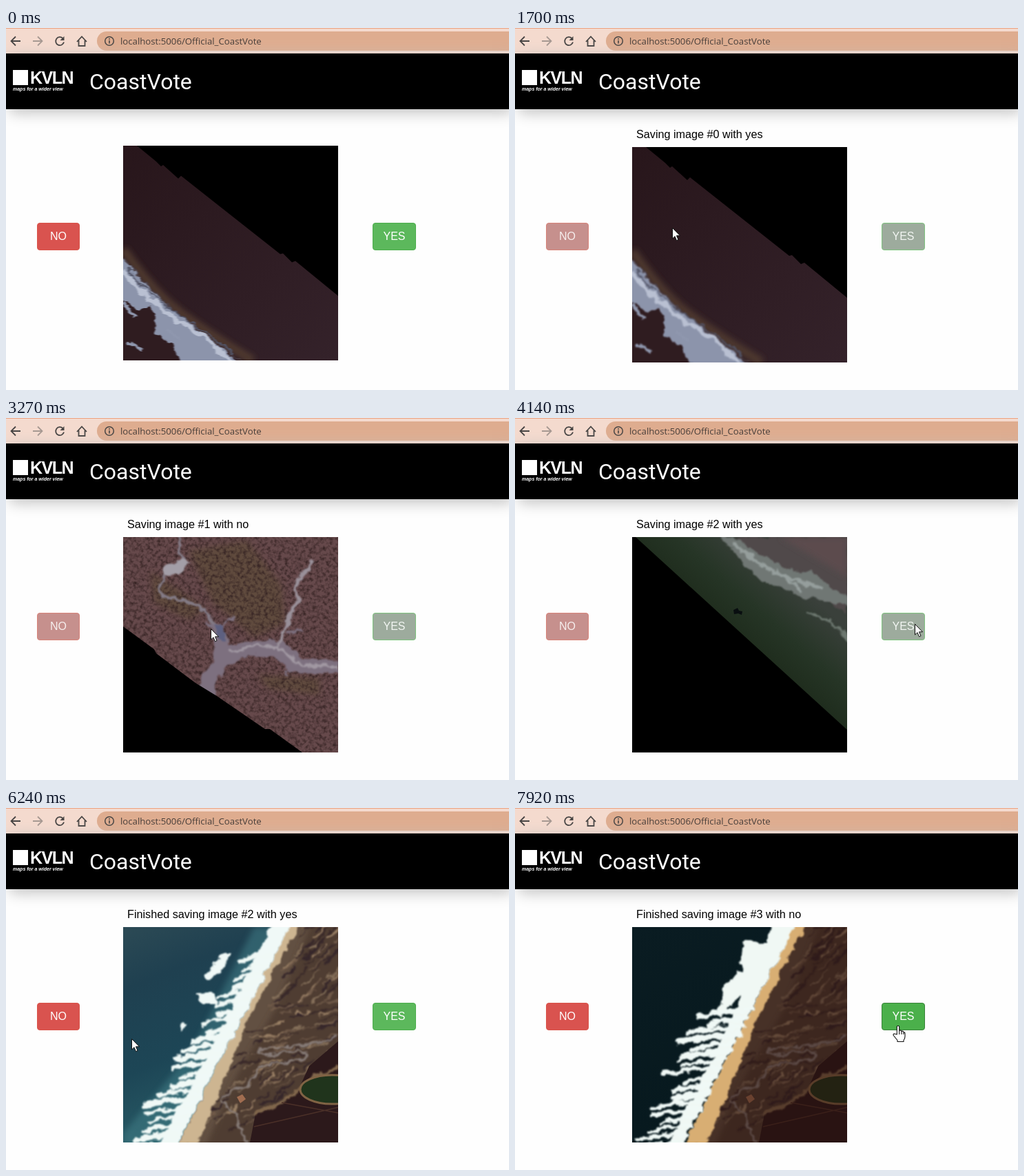
Write an HTML page that moves like this. It is 730x526 px and loops after 7990 ms.

```html
<!DOCTYPE html>
<html lang="en">
<head>
<meta charset="utf-8">
<title>CoastVote</title>
<style>
html, body { margin: 0; width: 100%; height: 100%; overflow: hidden; background: #fefefe; }
#stage { position: relative; width: 730px; height: 526px; overflow: hidden; }
#stage > * { position: absolute; }
#bar { left: 0; top: 0; width: 730px; height: 37px; background: #f4dace; box-shadow: inset 0 1px #eba383; }
#bar svg { position: absolute; left: 0; top: 0; }
#url { position: absolute; left: 166px; top: 10px; font: 13.2px/18px "Open Sans", sans-serif; color: #453c38; }
#head { left: 0; top: 37px; width: 730px; height: 81px; background: #000; color: #fff; box-shadow: 5px 5px 20px silver; }
#head * { position: absolute; white-space: nowrap; }
#mark { left: 10px; top: 24px; width: 22px; height: 22px; background: #fff; }
#org { left: 35px; top: 20px; font: bold 25px/30px "Liberation Sans", sans-serif; letter-spacing: -1.5px; }
#tag { left: 10px; top: 47px; font: italic bold 7px/10px "Liberation Sans", sans-serif; }
#name { left: 121px; top: 21px; font: 32px/40px Roboto, sans-serif; }
#msg { left: 176px; top: 145px; font: 16.2px/19px "Liberation Sans", Arial, sans-serif; color: #000; white-space: nowrap; }
.btn { top: 283px; height: 40px; box-sizing: border-box; border: 1px solid; border-radius: 4px; color: #fff;
  font: 16px/38px "Liberation Sans", Arial, sans-serif; text-align: center; }
#no { left: 45px; width: 62px; background: #d9534f; border-color: #d9544a; }
#yes { left: 532px; width: 63px; background: #5cb85c; border-color: #4cae4c; }
#no.hover { background: #d2413c; border-color: #ac2925; }
#yes.hover { background: #4bb04b; border-color: #398439; }
#no.off { background: #c6908d; border-color: #d9847a; color: #f6efee; }
#yes.off { background: #9dab9d; border-color: #7fc47f; color: #f2f5f2; }
#view { left: 170px; top: 173px; transform-origin: 0 0; }
.pic { visibility: hidden; }
.pic.on { visibility: visible; }
.lines { fill: none; stroke-linecap: round; }
#cursor { left: 0; top: 0; overflow: visible; fill: #fff; stroke: #111; stroke-linejoin: round; }
</style>
</head>
<body>
<div id="stage">
  <div id="bar">
    <svg width="730" height="37" fill="none" stroke="#474443" stroke-width="1.8">
      <rect x="132" y="5" width="640" height="28" rx="14" fill="#deac8f" stroke="none"/>
      <path d="M21 19H8M14 12.500L7.500 19L14 25.500"/>
      <path d="M39 19H52M46 12.500L52.500 19L46 25.500" stroke="#a69891"/>
      <path d="M82.500 15A6 6 0 1 0 84 20.500"/>
      <path d="M84.500 12V18H78.500Z" fill="#474443" stroke="none"/>
      <path d="M103 20L110 12.500L117 20M105.500 18V26H114.500V18"/>
      <circle cx="150" cy="19" r="6.300" stroke-width="1.500"/>
      <path d="M150 18V22.500M150 15V16.700" stroke-width="1.600"/>
    </svg>
    <div id="url">localhost:5006/Official_CoastVote</div>
  </div>
  <div id="head">
    <div id="mark"></div><div id="org">KVLN</div>
    <div id="tag">maps for a wider view</div>
    <div id="name">CoastVote</div>
  </div>
  <div id="msg"></div>

  <svg id="view" width="312" height="313" viewBox="0 0 312 313">
    <defs>
      <filter id="rough" x="-10%" y="-10%" width="120%" height="120%" color-interpolation-filters="sRGB">
        <feTurbulence type="fractalNoise" baseFrequency=".07" numOctaves="3" seed="4"/>
        <feDisplacementMap in="SourceGraphic" scale="13" xChannelSelector="R" yChannelSelector="G"/>
        <feGaussianBlur stdDeviation=".8"/>
      </filter>
      <filter id="mottle" x="0" y="0" width="100%" height="100%" color-interpolation-filters="sRGB">
        <feTurbulence type="fractalNoise" baseFrequency=".2" numOctaves="2" seed="7"/>
        <feColorMatrix values="0 0 0 0 .2  0 0 0 0 .13  0 0 0 0 .13  2 0 0 0 -.8"/>
        <feGaussianBlur stdDeviation=".6"/>
      </filter>
      <filter id="soft"><feGaussianBlur stdDeviation="4"/></filter>
      <linearGradient id="mud" x2="1" y2="1"><stop stop-color="#28161b"/><stop offset="1" stop-color="#34222a"/></linearGradient>
      <linearGradient id="green" x1=".4" y1=".6" x2=".75" y2=".2"><stop stop-color="#172313"/><stop offset=".6" stop-color="#263526"/><stop offset="1" stop-color="#3a403b"/></linearGradient>
      <linearGradient id="teal" x2=".4" y2="1"><stop stop-color="#2c4a55"/><stop offset=".25" stop-color="#1f4050"/><stop offset=".6" stop-color="#1d4656"/><stop offset="1" stop-color="#2c616a"/></linearGradient>
      <linearGradient id="deep" x2=".6" y2="1"><stop stop-color="#0a1c22"/><stop offset="1" stop-color="#06181d"/></linearGradient>
      <g id="land">
        <path d="M244 0H312V313H81Z" fill="#625042"/>
        <path d="M275 -10H330V323H118L165 215L220 120Z" fill="#4f3d33" filter="url(#soft)"/>
        <g id="streaks" class="lines" filter="url(#rough)"></g>
        <path d="M312 166L270 202L255 235L226 258L192 272L184 313H312Z" fill="#2c191b"/>
        <path d="M192 268Q225 262 256 237Q270 218 312 205" fill="none" stroke="#80664b" stroke-width="6" filter="url(#rough)"/>
        <path d="M230 255L312 270M190 290L312 262" stroke="#4b3028" stroke-width="1.500"/>
        <path d="M311 158Q300 168 280 169T240 174T198 175Q196 190 225 184T267 181Q268 193 244 195T198 204Q186 224 178 233Q157 238 146 244Q136 254 154 262Q168 270 168 292L180 313" fill="none" stroke="#857a76" stroke-width="3" filter="url(#rough)"/>
        <ellipse cx="303" cy="236" rx="46" ry="21" fill="#20341c" stroke="#806344" stroke-width="3"/>
        <path d="M165 247l8-4 5 7-8 6z" fill="#a16d50"/>
      </g>
    </defs>

    <g class="pic">
      <path d="M0 0H312V313H0Z" fill="url(#mud)"/>
      <path d="M20 0L48 23L55 30L58 28L80 48L84 44L228 158L232 157L245 170L250 168L312 219V0Z"/>
      <path d="M0 151Q30 195 60 224T188 313" fill="none" stroke="#4d392f" stroke-width="13" filter="url(#soft)"/>
      <g filter="url(#rough)">
        <path d="M0 165Q30 203 65 232T182 325H-9V165Z" fill="#8c94ab"/>
        <path d="M-9 219L18 238L40 234L50 258L48 276L72 290L91 325H-9Z" fill="#2f1c20"/>
        <path d="M0 182L35 221L75 252L116 278L155 313" fill="none" stroke="#b9c0d2" stroke-width="7"/>
        <path d="M0 165Q30 203 65 232T172 313" fill="none" stroke="#4b3f45" stroke-width="2"/>
        <path d="M6 178Q36 217 80 245T160 302" fill="none" stroke="#525466" stroke-width="2"/>
        <path d="M0 229L15 250M5 285L28 297M60 265L82 282" stroke="#8f97ae" stroke-width="5"/>
      </g>
    </g>

    <g class="pic">
      <path d="M0 0H312V313H0Z" fill="#66494b"/>
      <g fill="#5b4b35" opacity=".6" filter="url(#soft)">
        <path d="M95 20L180 5L230 70L235 125L190 145L130 95Z"/>
        <path d="M40 50L82 78L120 105L95 120L45 95ZM195 200L285 205L285 230L210 220Z"/>
      </g>
      <path d="M0 0H312V313H0Z" filter="url(#mottle)"/>
      <g fill="none" stroke-linejoin="round" filter="url(#rough)">
        <path d="M106 236L114 200L133 178L132 146L120 125L143 127L153 157L187 151L226 148L258 174L312 181V198L245 197L217 174L178 172L148 190L135 216L130 238Z" fill="#7d707f"/>
        <path d="M80 -5L82 18L88 35M62 54L53 70L57 87L92 91L120 107L140 137" stroke="#837b86" stroke-width="4.500"/>
        <path d="M60 43L85 31L96 38L80 55L62 54Z" fill="#a39ea7"/>
        <path d="M275 35L262 56L250 63L254 93L242 111L240 130L223 157" stroke="#9a919a" stroke-width="5"/>
        <path d="M240 141L262 134M145 130L153 118L164 115M238 193L236 199" stroke="#7d7180" stroke-width="3"/>
        <path d="M155 165L190 158L224 159L254 184L312 190" stroke="#a198a2" stroke-width="4"/>
        <path d="M132 128L145 128L147 150L138 146Z" fill="#5d6080"/>
      </g>
      <path d="M0 130L45 163L48 169L105 212L136 231L206 279L213 279L260 313H0Z"/>
    </g>

    <g class="pic">
      <path d="M0 0H312V313H0Z" fill="url(#green)"/>
      <path d="M145 0H312V111L268 80L225 65Z" fill="#50494a" filter="url(#rough)"/>
      <path d="M215 0H312V58Z" fill="#5b4c4e" filter="url(#soft)"/>
      <g filter="url(#rough)">
        <path d="M125 -5L154 4L189 28L235 49L265 53L295 78L316 88V103L282 91L250 90L215 72L185 62L160 35Z" fill="#707774"/>
        <path d="M145 9L190 43L233 62L277 75M206 47L245 78" fill="none" stroke="#959e9c" stroke-width="5"/>
        <path d="M253 108L278 119L298 132L315 149" fill="none" stroke="#6c776f" stroke-width="4"/>
      </g>
      <path d="M5 0L312 280V313H0V0Z"/>
      <path d="M147 106l6 -3 2 4 5 1-1 5-5-2-6 1z" fill="#090e10"/>
    </g>

    <g class="pic">
      <path d="M0 0H312V313H0Z" fill="url(#teal)"/>
      <path d="M190 0L100 180L0 300V323H90L240 0Z" fill="#3f7c85" opacity=".55" filter="url(#soft)"/>
      <use href="#land"/>
      <path d="M242 -5H256L185 127L108 318H78Z" fill="#cdb591" filter="url(#rough)"/>
      <g fill="#f0f9f7" filter="url(#rough)">
        <path d="M219 -8H246L77 318H52L148 138L180 70Z"/>
        <path d="M140 40L155 40L150 60L124 77L120 70ZM104 95L132 94L137 112L116 112ZM82 138L94 142L83 152Z"/>
        <g id="calm" class="lines"></g>
      </g>
    </g>

    <g class="pic">
      <path d="M0 0H312V313H0Z" fill="url(#deep)"/>
      <use href="#land"/>
      <path d="M244 0H312V313H81Z" fill="#260d08" opacity=".45"/>
      <path d="M235 -5H252L185 127L108 318H74Z" fill="#d8ae73" filter="url(#rough)"/>
      <g fill="#f0f8f4" filter="url(#rough)">
        <path d="M206 -8H240L70 318H52L142 138Z"/>
        <path d="M162 22L222 20L196 75L150 105L125 135L132 85L158 62Z"/>
        <g id="wild" class="lines"></g>
      </g>
    </g>
  </svg>

  <div id="no" class="btn">NO</div>
  <div id="yes" class="btn">YES</div>
  <svg id="cursor" width="1" height="1">
    <path id="arrow" d="M.5 .5V16L4 12.700L6.500 18.700L9 17.600L6.500 11.800H11.500Z"/>
    <path id="hand" d="M-1.700 13V2Q-1.700 .5 0 .5T1.700 2V8Q2 6.800 3.500 7T5 9Q6 7.800 7 8.300T8 10Q10 9.500 10 12V16Q10 19 8 21.500V23.500H-1V21.500Q-4 18 -7 14Q-7 11.500 -4.500 12.300ZM1.700 8V13M5 9V13M8 10V13" stroke-width="1.100"/>
  </svg>
</div>
<script>
const $ = id => document.getElementById(id);
const LOOP = 7990, TICKS = 118;
const pics = [...document.querySelectorAll('.pic')];

// tick, message, picture, buttons enabled
const states = [
  [0, '', 0, true],
  [14, 'Saving image #0 with yes', 0, false],
  [27, 'Finished saving image #0 with yes', 1, true],
  [40, 'Saving image #1 with no', 1, false],
  [53, 'Finished saving image #1 with no', 2, true],
  [59, 'Saving image #2 with yes', 2, false],
  [69, 'Finished saving image #2 with yes', 3, true],
  [110, 'Saving image #3 with no', 3, false],
  [114, 'Finished saving image #3 with no', 4, true]
];

// tick, x, y of the pointer tip
const path = [
  [0, 760, 560], [1, 680, 478], [5, 605, 380], [9, 566, 316], [12, 559, 300],
  [20, 559, 300], [22, 430, 294], [25, 228, 290], [28, 160, 291], [32, 105, 297],
  [36, 65, 294], [38, 63, 294], [44, 63, 294], [47, 210, 306], [50, 470, 305],
  [53, 580, 299], [72, 580, 299], [75, 430, 308], [79, 152, 305], [82, 96, 309],
  [84, 75, 306], [87, 85, 311], [90, 155, 331], [93, 195, 337], [100, 195, 337],
  [104, 145, 316], [108, 97, 297], [112, 92, 297], [113, 92, 297], [115, 330, 309], [117, 556, 316]
];

function pointer(tick) {
  const i = path.findIndex(p => p[0] > tick);
  if (i < 0) return path.at(-1).slice(1);
  const [t0, x0, y0] = path[i - 1], [t1, x1, y1] = path[i];
  const k = (tick - t0) / (t1 - t0);
  return [x0 + (x1 - x0) * k, y0 + (y1 - y0) * k];
}

let seed = 11;
const rand = () => (seed = seed * 16807 % 2147483647) / 2147483647;
const coast = y => 244 - .52 * y;
const stroke = (x, y, curve, color, width) =>
  `<path d="M${x} ${y}q${curve}" stroke="${color}" stroke-width="${width}"/>`;

function drawDunes() {
  const tones = ['#85705a', '#35262a', '#9a8065', '#3a2a29', '#705a49'];
  let out = '';
  for (let i = 0; i < 200; i++) {
    const y = rand() * 300, left = coast(y) + 16;
    const x = left + rand() * Math.max(70, 305 - left);
    const len = 10 + rand() * 22, rise = y < 110 ? len : y < 200 ? 4 : 14;
    out += stroke(x, y, `${len / 2} ${-rise / 4} ${len} ${-rise}`, tones[i % 5], 1 + rand() * 2.5);
  }
  $('streaks').innerHTML = out;
}

// fingers of foam running from the shore out to sea
function drawFoam(id, from, step, reach, spread) {
  let out = '';
  for (let y = from; y < 320; y += step) {
    const len = reach(y) + rand() * spread;
    out += stroke(coast(y) - 8, y, `${-len / 2} 2 ${-len} 10`, '#f0f9f6', 4 + rand() * 5);
  }
  $(id).innerHTML = out;
}

function setButton(id, left, width, enabled, x, y) {
  const over = enabled && x >= left && x < left + width && y >= 283 && y < 323;
  $(id).className = 'btn' + (enabled ? over ? ' hover' : '' : ' off');
  return over;
}

function render(tick) {
  const [since, text, pic, enabled] = states.findLast(s => s[0] <= tick);
  const [x, y] = pointer(tick).map(Math.round);
  $('msg').textContent = text;
  $('view').style.transform = text ? '' : 'translateY(-2px) scaleY(.9968)';
  pics.forEach((p, i) => p.classList.toggle('on', i === pic));
  const overNo = setButton('no', 45, 62, enabled, x, y);
  const overYes = setButton('yes', 532, 63, enabled, x, y);
  // the pointer shape lags behind re-enabled buttons
  const hand = (overNo || overYes) && (since === 0 || tick - since >= 3);
  $('hand').style.display = hand ? '' : 'none';
  $('arrow').style.display = hand ? 'none' : '';
  $('cursor').style.transform = `translate(${x}px, ${y}px)`;
}

drawDunes();
drawFoam('calm', 40, 13, y => 15 + y * .12, 30);
drawFoam('wild', 120, 12, () => 42, 45);
const start = performance.now();
let last = -1;
function loop() {
  const t = (performance.now() - start) % LOOP;
  const tick = Math.min(TICKS - 1, Math.floor(t * TICKS / LOOP + .06));
  if (tick !== last) render(last = tick);
  requestAnimationFrame(loop);
}
loop();
</script>
</body>
</html>
```
